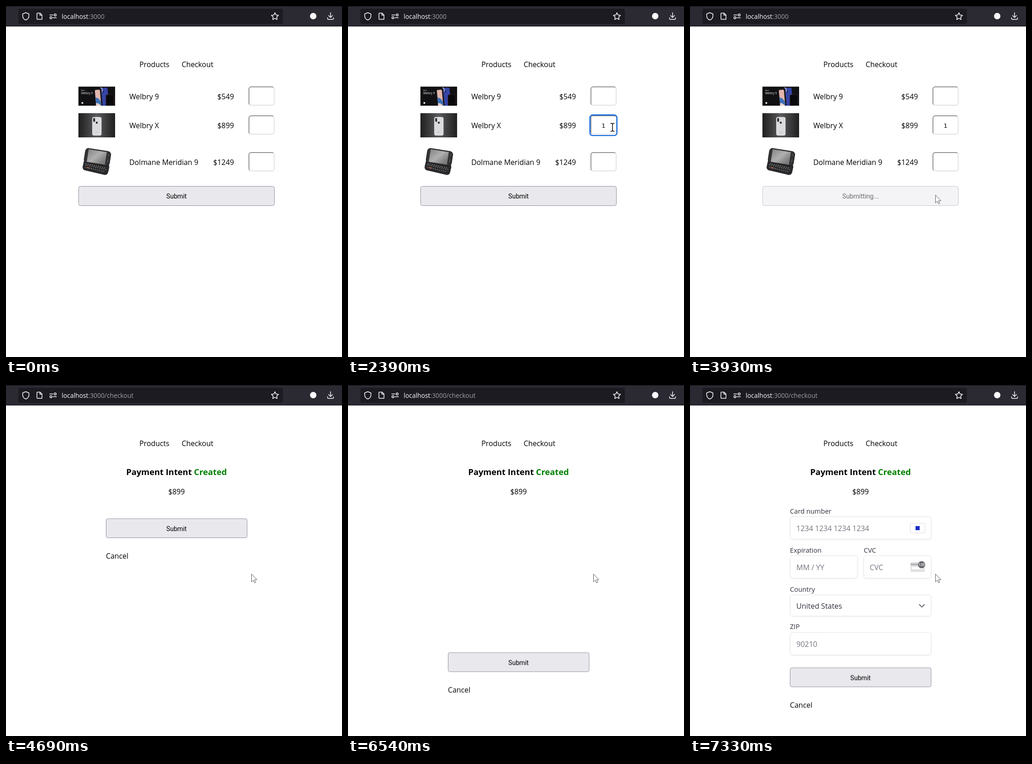
An HTML page for the animation above (8000 ms loop, 733 by 764 pixels).

```html
<!DOCTYPE html>
<html lang="en">
<head>
<meta charset="utf-8">
<title>Checkout demo</title>
<style>
html, body { margin: 0; width: 100%; height: 100%; overflow: hidden; background: #fff; }
svg { position: absolute; left: 0; top: 0; font: 15.85px "Open Sans", "Noto Sans", sans-serif; }
.qty { position: absolute; left: 528.5px; width: 57px; height: 42px; box-sizing: border-box;
  border: 2px solid; border-color: #949497 #e3e3e5 #e3e3e5 #949497; border-radius: 6px; }
.mid { text-anchor: middle; }
.end { text-anchor: end; }
.icon { fill: none; stroke: #fbfbfe; stroke-width: 1.5; stroke-linejoin: round; stroke-linecap: round; }
.url { font-size: 13.85px; fill: #a09fa6; }
.btn { fill: #e9e9ed; stroke: #8f8f9d; }
.btn-text { font: 14.1px Roboto, sans-serif; text-anchor: middle; }
.digit { font: 13px "DejaVu Sans", sans-serif; text-anchor: middle; }
.field { fill: #fff; stroke: #e4e4e6; filter: drop-shadow(0 1px 1.5px rgba(0,0,0,.06)); }
.pill { fill: #f6f6f7; }
.label { font-size: 14.65px; fill: #30313d; }
.value { font-size: 16px; fill: #757680; }

/* One loop is 8 s: 1% = 80 ms */
[class*="t-"] { animation: 8s step-end infinite; }
.t-shop { animation-name: shop; }
.t-path { animation-name: path; }
.t-heading { animation-name: heading; }
.t-ring { animation-name: ring; }
.t-caret { animation-name: caret; }
.t-one { animation-name: one; }
.t-press { animation-name: press; }
.t-ready { animation-name: ready; }
.t-busy { animation-name: busy; }
.t-skeleton { animation-name: skeleton; }
.t-fields { animation-name: fields; }
.t-details { animation-name: details; }
.t-brand { animation-name: brand; }
.t-actions { animation-name: actions; }
.t-cursor { animation-name: cursor; }
.t-arrow { animation-name: arrow; }
.t-beam { animation-name: beam; }

@keyframes shop { 0% { opacity: 1 } 57.625%, to { opacity: 0 } }
@keyframes path { 0% { opacity: 0 } 57.625%, to { opacity: 1 } }
@keyframes heading { 0% { opacity: 0 } 58.625%, to { opacity: 1 } }
@keyframes ring { 0% { opacity: 0 } 16.375% { opacity: 1 } 48.25%, to { opacity: 0 } }
@keyframes caret {
  0% { opacity: 0; transform: none }
  16.375% { opacity: 1 }
  23.25% { opacity: 0 }
  27.375% { opacity: 1; transform: translateX(4.5px) }
  29.875% { opacity: 0; transform: translateX(4.5px) }
  36.5% { opacity: 1; transform: translateX(4.5px) }
  43.125%, to { opacity: 0; transform: translateX(4.5px) }
}
@keyframes one { 0% { opacity: 0 } 27.375%, to { opacity: 1 } }
@keyframes press {
  0% { fill: #e9e9ed; opacity: 1 }
  44.875% { fill: #d0d0d7; opacity: 1 }
  48.25% { fill: #b1b1b9; opacity: 1 }
  49.125%, to { fill: #e9e9ed; opacity: .5 }
}
@keyframes ready { 0% { opacity: 1 } 49.125%, to { opacity: 0 } }
@keyframes busy { 0% { opacity: 0 } 49.125%, to { opacity: 1 } }
@keyframes skeleton { 0% { opacity: 0 } 68.625% { opacity: 1 } 81.75%, to { opacity: 0 } }
@keyframes fields {
  0% { opacity: 0 } 82.625% { opacity: .3 } 83.5% { opacity: .7 } 84.375%, to { opacity: 1 }
}
@keyframes details {
  0% { opacity: 0 } 86.125% { opacity: .2 } 87% { opacity: .4 }
  87.75% { opacity: .6 } 88.625% { opacity: .8 } 89.375%, to { opacity: 1 }
}
@keyframes brand { 0% { opacity: .8 } 91.625%, to { opacity: 1 } }
@keyframes actions {
  0% { opacity: 0; transform: translateY(291px) }
  58.625% { opacity: 1; transform: translateY(291px) }
  68.625% { opacity: 1; transform: translateY(540.5px) }
  81.75% { opacity: 1; transform: translateY(582.5px) }
  82.625%, to { opacity: 1; transform: translateY(615.5px) }
}
@keyframes cursor {
  0% { transform: translate(712px, 284px) }
  7.1% { transform: translate(690px, 281px) }
  7.95% { transform: translate(666px, 278px) }
  8.8% { transform: translate(643px, 275px) }
  9.65% { transform: translate(624px, 272px) }
  10.5% { transform: translate(608px, 270px) }
  11.35% { transform: translate(597px, 268px) }
  12.2% { transform: translate(589px, 267px) }
  13.05% { transform: translate(582px, 266px) }
  13.9% { transform: translate(579px, 265px) }
  14.75% { transform: translate(577px, 264px) }
  39.875% { transform: translate(573px, 274px) }
  40.75% { transform: translate(566px, 294px) }
  41.625% { transform: translate(558px, 322px) }
  42.5% { transform: translate(552px, 350px) }
  43.375% { transform: translate(547px, 376px) }
  44.125% { transform: translate(542px, 394px) }
  44.875% { transform: translate(540px, 400px) }
  45.75% { transform: translate(537px, 407px) }
  46.625%, to { transform: translate(535px, 411px) }
}
@keyframes arrow {
  0% { opacity: 0 } 6.25% { opacity: 1 } 13.05% { opacity: 0 } 40.75% { opacity: 1 }
  41.625% { opacity: 0 } 43.375%, to { opacity: 1 }
}
@keyframes beam {
  0% { opacity: 0 } 13.05% { opacity: 1 } 40.75% { opacity: 0 }
  41.625% { opacity: 1 } 43.375%, to { opacity: 0 }
}
</style>
</head>
<body>
<div class="t-shop">
  <div class="qty" style="top:175px"></div>
  <div class="qty" style="top:238px"></div>
  <div class="qty" style="top:318px"></div>
</div>
<svg width="733" height="764" viewBox="0 0 733 764">
  <defs>
    <linearGradient id="studio">
      <stop stop-color="#1f1f20"/><stop offset=".5" stop-color="#5a5a5c"/><stop offset="1" stop-color="#1f1f20"/>
    </linearGradient>
    <linearGradient id="screen" x2="1" y2=".6">
      <stop stop-color="#858585"/><stop offset=".55" stop-color="#b0b0b0"/><stop offset="1" stop-color="#7c7c7c"/>
    </linearGradient>
    <clipPath id="banner"><path d="M158 175.5h80v41.5h-80z"/></clipPath>
  </defs>

  <!-- Browser bar -->
  <path fill="#2b2a33" d="M0 0h733v43H0z"/>
  <path fill="#0e0e12" d="M0 0h733v1H0zM0 43h733v1.5H0z"/>
  <rect x="27" y="6" width="577" height="33" rx="4" fill="#1c1b22"/>
  <g class="icon">
    <path d="M43.2 14.5l6.8 2.7v4c0 4.5-2.8 7.800-6.800 9.300-4-1.500-6.800-4.800-6.800-9.300v-4z"/>
    <path d="M68.500 15.500h6l4 4v9.500h-10c-.8 0-1-.3-1-1V16.500c0-.7.3-1 1-1zM74 15.800v4.200h4.300"/>
    <path d="M95.500 19.500h7M102.500 25.500h7.500"/>
    <circle cx="107.300" cy="19.500" r="2.200"/><circle cx="98" cy="25.500" r="2.200"/>
    <path transform="translate(586.7 22.8)" d="M0-8.200 2.400-3.200 7.800-2.500 3.800 1.300 4.800 6.700 0 4.100-4.800 6.700-3.800 1.300-7.800-2.500-2.400-3.200z"/>
    <path d="M708 14.500v10.300M703.700 20.700l4.300 4.300 4.300-4.300M701.500 25.500v2c0 1 .7 1.700 1.700 1.700h9.600c1 0 1.700-.7 1.700-1.700v-2"/>
  </g>
  <circle cx="670.200" cy="22" r="7" fill="#fbfbfe"/>
  <text class="url" x="121.500" y="28"><tspan fill="#fbfbfe">localhost</tspan>:3000</text>
  <text class="url t-path" x="214.800" y="28">/checkout</text>

  <text x="291" y="132.500">Products</text>
  <text x="383.200" y="132.500">Checkout</text>

  <!-- Product list -->
  <g class="t-shop">
    <g clip-path="url(#banner)">
      <path fill="#111113" d="M158 175h80v42h-80z"/>
      <g transform="rotate(-5 205 197)">
        <rect x="205" y="179" width="18" height="45" rx="3" fill="#3545a5"/>
        <circle cx="212" cy="187" r="2" fill="#12142f"/>
        <rect x="194" y="178" width="15" height="46" rx="3" fill="#17171b"/>
        <rect x="195" y="182" width="11" height="42" rx="2" fill="#e3b7ab"/>
        <path d="M195 198q9 3 11 12v8h-11z" fill="#3c70b8"/>
        <path d="M195 211q6-1 11 7v6h-11z" fill="#e9cfc8"/>
      </g>
      <path d="M206 178.500q3.500-1.500 4 4v5" fill="none" stroke="#e4e4ea" stroke-width="1.200"/>
      <rect x="218" y="193" width="17" height="32" rx="3" fill="#09090b" stroke="#44222b" stroke-width=".7"/>
      <g fill="#f2f2f2">
        <text x="164" y="184.500" font-size="3.500">Meet</text>
        <text x="164" y="191.700" font-size="6.200">Welbry 9</text>
        <circle cx="166.500" cy="211" r="2"/>
      </g>
    </g>

    <path fill="url(#studio)" d="M158 233.300h80v52.700h-80z"/>
    <rect x="188.500" y="242" width="19.500" height="39.500" rx="3" fill="#dadadd" stroke="#f4f4f5" stroke-width=".7"/>
    <rect x="190.300" y="243.700" width="4" height="8.500" rx="2" fill="#29292b"/>
    <circle cx="198" cy="254" r="2.200" fill="#29292b"/>
    <path stroke="#aaa" stroke-width=".7" d="M195 274.500h6"/>

    <g transform="rotate(13 196 351.500)">
      <rect x="167.500" y="338" width="57" height="25" rx="7" fill="#29292b"/>
      <path d="M173 348h45M172 351h47M173 356h45" stroke="#a2a2a4" stroke-width="1.300" stroke-dasharray="2 2.500"/>
      <path d="M177 356h5" stroke="#d46b3a" stroke-width="2"/>
    </g>
    <g transform="rotate(9 199.500 329)">
      <rect x="171.500" y="313" width="56" height="32" rx="7" fill="#333335" stroke="#171719"/>
      <path fill="url(#screen)" d="M178 315h40v27.500h-40z"/>
      <path d="M223 319v4M223 331v5" stroke="#747477"/>
    </g>

    <text x="269" y="203">Welbry 9</text>
    <text x="269" y="266">Welbry X</text>
    <text x="269" y="346">Dolmane Meridian 9</text>
    <text class="end" x="497.300" y="203">$549</text>
    <text class="end" x="497.300" y="266">$899</text>
    <text class="end" x="497.300" y="346">$1249</text>

    <rect class="t-ring" x="527.700" y="237.200" width="59" height="44.800" rx="6" fill="none" stroke="#0060df" stroke-width="2.200"/>
    <text class="digit t-one" x="557.500" y="265">1</text>
    <path class="t-caret" d="M557 250h1v18h-1z"/>

    <rect class="btn t-press" x="158.500" y="392.500" width="427" height="42" rx="4"/>
    <text class="btn-text t-ready" x="372" y="419">Submit</text>
    <text class="btn-text t-busy" x="372" y="419" fill="#6d6d70">Submitting...</text>
  </g>

  <!-- Checkout -->
  <g class="t-heading">
    <text class="mid" x="372" y="195.500" font-size="18.300" font-weight="700">Payment Intent <tspan fill="#008000">Created</tspan></text>
    <text class="mid" x="372" y="238.300">$899</text>
  </g>

  <g class="t-skeleton">
    <rect class="field" x="218.500" y="264.500" width="149" height="65.500" rx="5"/>
    <rect class="field" x="377" y="264.500" width="149" height="65.500" rx="5"/>
    <rect class="field" x="218.500" y="365.500" width="307.500" height="49.500" rx="5"/>
    <rect class="field" x="218.500" y="451" width="147" height="49.500" rx="5"/>
    <rect class="field" x="379" y="451" width="147" height="49.500" rx="5"/>
    <g class="pill">
      <rect x="232" y="277" width="23" height="17.500" rx="5"/>
      <rect x="232" y="298.500" width="48.500" height="18.500" rx="5"/>
      <rect x="390" y="277" width="23.500" height="17.500" rx="5"/>
      <rect x="390" y="298.500" width="49" height="18.500" rx="5"/>
      <rect x="218" y="342.500" width="62" height="16" rx="7"/>
      <rect x="234" y="381" width="62" height="14" rx="7"/>
      <rect x="218" y="428" width="34" height="16" rx="7"/>
      <rect x="378" y="428" width="23" height="16" rx="7"/>
      <rect x="234" y="466" width="34" height="14" rx="7"/>
      <rect x="394" y="466" width="22.500" height="14" rx="7"/>
    </g>
  </g>

  <g class="t-fields">
    <rect class="field" x="218.500" y="286.500" width="307.500" height="49" rx="5"/>
    <rect class="field" x="218.500" y="371.500" width="147" height="49" rx="5"/>
    <rect class="field" x="379" y="371.500" width="147" height="49" rx="5"/>
    <rect class="field" x="218.500" y="457" width="307.500" height="46" rx="5"/>
    <rect class="field" x="218.500" y="538.700" width="307.500" height="49" rx="5"/>
  </g>
  <g class="t-details">
    <g class="label">
      <text x="218" y="279.500">Card number</text>
      <text x="218" y="364.500">Expiration</text>
      <text x="379" y="364.500">CVC</text>
      <text x="218" y="449.500">Country</text>
      <text x="218" y="531.300">ZIP</text>
    </g>
    <g class="value">
      <text x="232" y="318">1234 1234 1234 1234</text>
      <text x="232" y="403">MM / YY</text>
      <text x="392" y="403">CVC</text>
      <text x="232" y="487" fill="#30313d">United States</text>
      <text x="232" y="570">90210</text>
    </g>
    <rect x="480.500" y="301" width="32" height="21" rx="2.500" fill="#fff" stroke="#dcdcdf"/>
    <rect class="t-brand" x="492" y="307" width="9" height="9" fill="#1a2fc4"/>
    <rect x="481" y="385.500" width="31" height="21.500" rx="2.500" fill="#e2e2e4"/>
    <path fill="#b5b5b8" d="M481 388.500h31v4h-31z"/>
    <path fill="#fff" d="M484 396h25v5h-25z"/>
    <circle cx="505.300" cy="391.300" r="7.800" fill="#66676d"/>
    <text class="mid" x="505.300" y="394.300" font-size="8" font-weight="600" fill="#fff">135</text>
    <path d="M500.500 478l5.300 5.300 5.300-5.300" fill="none" stroke="#5f606b" stroke-width="1.900" stroke-linecap="round" stroke-linejoin="round"/>
  </g>

  <g class="t-actions">
    <rect class="btn" x="218.500" width="307.500" height="41.500" rx="4"/>
    <text class="btn-text" x="372" y="26.500">Submit</text>
    <text x="218" y="86.500">Cancel</text>
  </g>

  <g class="t-cursor">
    <path class="t-arrow" d="M.5.5v17l4-3.700 2.600 5.900 2.700-1.100-2.600-5.800h5.300z" fill="#fff" stroke="#444" stroke-width=".9"/>
    <path class="t-beam" d="M-4.500-8.500h2.500q2 0 2 2v13q0 2-2 2h-2.500M4.500-8.500h-2.500q-2 0-2 2v13q0 2 2 2h2.500" fill="none" stroke="#000" stroke-width="1.500"/>
  </g>
</svg>
</body>
</html>
```
